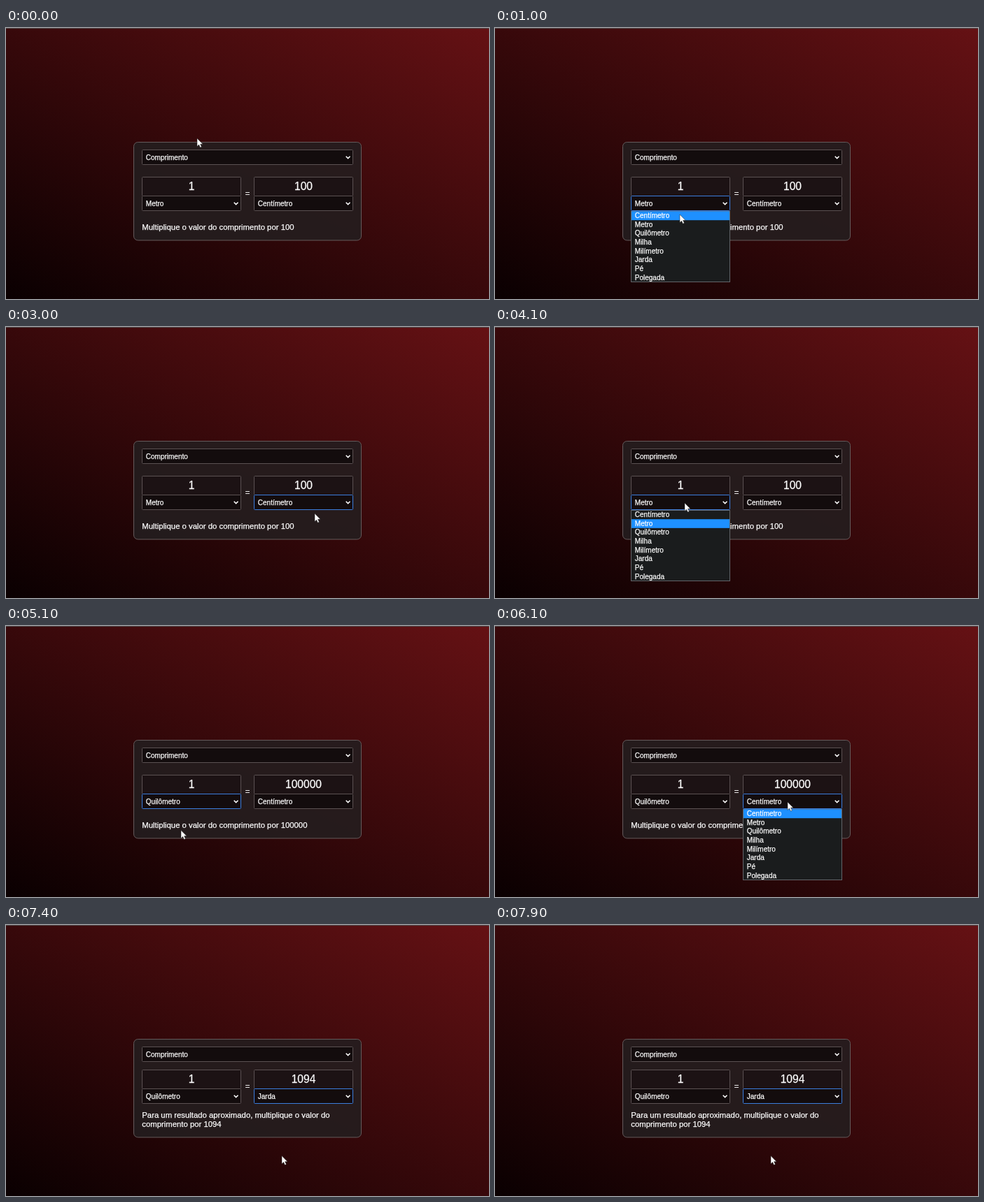
Recreate the animation shown at these times as an HTML page. Size 690 px wide and 388 px high, loop 8 s.

```html
<!DOCTYPE html>
<html lang="pt-BR">
<head>
<meta charset="utf-8">
<title>Conversor de medidas</title>
<style>
html, body { margin: 0; width: 100%; height: 100%; overflow: hidden; background: #000; }
body { background: linear-gradient(to top right, #0a0001, #651114); }
svg { display: block; width: 690px; height: 388px; font: 10px "Liberation Sans", Arial, sans-serif; fill: #fff; }
text { stroke: #fff; stroke-width: .25px; }
.note { font-size: 11.34px; }
.value { font-size: 15.6px; text-anchor: middle; }
</style>
</head>
<body>
<svg viewBox="0 0 690 388"></svg>
<script>
const svg = document.querySelector('svg');
const LOOP = 8000, STEP = 100;
const FIELD_X = [194.5, 354.5], FIELD_W = 141, SELECT_H = 21, LIST_TOP = 262, ROW = 12.68;

// Unit lengths in metres
const UNITS = {
  'Centímetro': .01, 'Metro': 1, 'Quilômetro': 1000, 'Milha': 1609.344,
  'Milímetro': .001, 'Jarda': .9144, 'Pé': .3048, 'Polegada': .0254
};
const NAMES = Object.keys(UNITS);

// x0 and x1: pointer when it opens the list and when it picks the unit
const PICKS = [
  { open: 600, pick: 1200, side: 0, unit: 'Centímetro', x0: 270, x1: 264 },
  { open: 2200, pick: 3000, side: 1, unit: 'Centímetro', x0: 444, x1: 441 },
  { open: 4000, pick: 5100, side: 0, unit: 'Quilômetro', x0: 271, x1: 250 },
  { open: 6100, pick: 7300, side: 1, unit: 'Jarda', x0: 418, x1: 394 }
];

function pointerAt(t) {
  let x = 273, y = 158;
  const glide = (start, end, toX, toY) => {
    const k = Math.min(1, Math.max(0, (t - start) / (end - start)));
    const e = k * k * (3 - 2 * k);
    x += (toX - x) * e;
    y += (toY - y) * e;
  };
  for (const p of PICKS) {
    glide(p.open - 600, p.open - 100, p.x0, 252);
    glide(p.open + 200, p.pick - 200, p.x1, LIST_TOP + ROW * (NAMES.indexOf(p.unit) + .4));
  }
  return [x, y];
}

// Choosing the unit of the other side swaps the two
function stateAt(t) {
  const units = ['Metro', 'Centímetro'];
  let focus = 0, open = null;
  if (t < PICKS[0].open) focus = -1;
  for (const { open: start, pick, side, unit } of PICKS) {
    if (t < start) break;
    focus = side;
    if (t < pick) { open = side; break; }
    if (units[1 - side] === unit) units[1 - side] = units[side];
    units[side] = unit;
  }
  return { units, focus, open };
}

function convert([from, to]) {
  const ratio = UNITS[from] / UNITS[to];
  const verb = ratio < 1 ? 'Divida' : 'Multiplique';
  const exact = ratio < 1 ? 1 / ratio : ratio;
  const factor = Math.round(exact);
  const result = String(ratio < 1 ? 1 / factor : factor).replace('.', ',');
  const lines = Math.abs(exact - factor) < 1e-6
    ? [`${verb} o valor do comprimento por ${factor}`]
    : [`Para um resultado aproximado, ${verb.toLowerCase()} o valor do`, `comprimento por ${factor}`];
  return { result, lines };
}

const box = (x, y, w, h, fill, stroke, r = 0) =>
  `<rect x="${x}" y="${y}" width="${w}" height="${h}" rx="${r}" fill="${fill}" stroke="${stroke}"/>`;
const text = (x, y, s, cls = '') => `<text x="${x}" y="${y}" class="${cls}">${s}</text>`;

function select(x, y, w, label, focused) {
  return box(x, y, w, SELECT_H, '#130c0d', focused ? '#3b7ddd' : '#5b5152', 1) +
    text(x + 5.3, y + 14.3, label) +
    `<path d="M${x + w - 9.8} ${y + 9.2}l2.9 2.9 2.9-2.9" fill="none" stroke="#fff" stroke-width="1.5"/>`;
}

function list(x, selected, pointerY) {
  const hover = Math.floor((pointerY - LIST_TOP) / ROW);
  const active = hover < 0 ? NAMES.indexOf(selected) : hover;
  return box(x, LIST_TOP + .5, FIELD_W, 101, '#1a1c1d', '#626468') +
    box(x + .5, LIST_TOP + .5 + active * ROW, FIELD_W - 1, ROW, '#1e90ff', 'none') +
    NAMES.map((name, i) => text(x + 5.3, LIST_TOP + 9.9 + i * ROW, name)).join('');
}

function draw(t) {
  const { units, focus, open } = stateAt(t);
  const { result, lines } = convert(units);
  const [px, py] = pointerAt(t);
  const lift = (lines.length - 1) * 6;
  const y = 213.5 - lift;

  const field = (value, side) => {
    const x = FIELD_X[side];
    return box(x, y, FIELD_W, 27, '#1c1214', '#5b5152', 1) +
      text(x + FIELD_W / 2, y + 18.7, value, 'value') +
      select(x, y + 27, FIELD_W, units[side], focus === side);
  };

  svg.innerHTML =
    box(0, 0, 690, 1, '#4d4546', 'none') +
    box(182.5, 163.5, 325, 140.5, 'rgba(36,30,31,.88)', '#655a5b', 6) +
    select(FIELD_X[0], 174.5, 301, 'Comprimento') +
    field('1', 0) +
    field(result, 1) +
    text(341.7, 241 - lift, '=', 'note') +
    lines.map((s, i) => text(194.3, 289 + (i + 1 - lines.length) * 13, s, 'note')).join('') +
    (open === null ? '' : list(FIELD_X[open], units[open], py)) +
    `<path transform="translate(${px} ${py})" d="M0 0v11.5l2.6-2.4 1.8 4 2-.9-1.8-3.9h3.5z" stroke="#222" stroke-width=".5"/>`;
}

function tick(now) {
  draw(Math.floor(now % LOOP / STEP) * STEP);
  requestAnimationFrame(tick);
}
requestAnimationFrame(tick);
</script>
</body>
</html>
```
